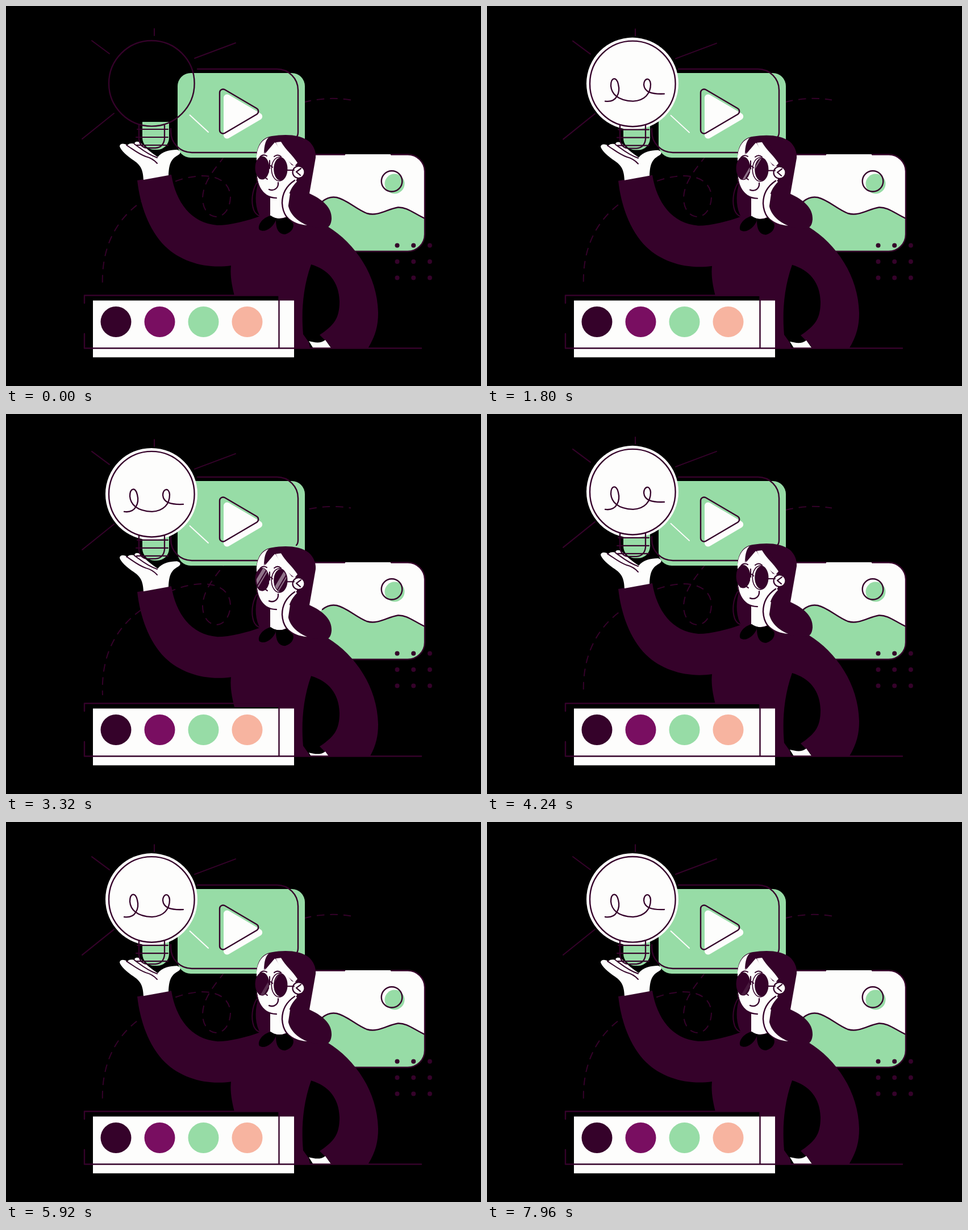
Write an HTML page with a canvas that moves like this. It is 836x669 px and loops after 8 s.

```html
<!DOCTYPE html>
<html lang="en">
<head>
<meta charset="utf-8">
<title>Creative idea</title>
<style>
html, body { margin: 0; width: 100%; height: 100%; overflow: hidden; background: #000; }
canvas { display: block; width: 836px; height: 669px; }
</style>
</head>
<body>
<canvas id="stage" width="836" height="669"></canvas>
<script>
const ctx = document.getElementById('stage').getContext('2d');
const LOOP = 8000, BOB = 2000, LIT = 320;
const BODY_DIP = 8, BULB_DIP = 6.4;
const DARK = '#35022a', WHITE = '#fdfdfc', GREEN = '#97dca6', BLACK = '#000';
const MAGENTA = '#790e61', PEACH = '#f7b4a0';

const fill = (d, color) => {
  ctx.fillStyle = color;
  ctx.fill(new Path2D(d));
};
const line = (d, color = DARK, width = 2.4) => {
  ctx.strokeStyle = color;
  ctx.lineWidth = width;
  ctx.stroke(new Path2D(d));
};
const oval = (x, y, rx, ry, color, stroke) => {
  ctx.beginPath();
  ctx.ellipse(x, y, rx, ry, 0, 0, Math.PI * 2);
  if (color) { ctx.fillStyle = color; ctx.fill(); }
  if (stroke) { ctx.strokeStyle = DARK; ctx.lineWidth = stroke; ctx.stroke(); }
};
const disc = (x, y, r, color, stroke) => oval(x, y, r, r, color, stroke);
const box = (x, y, w, h, r, color) => {
  ctx.beginPath();
  ctx.roundRect(x, y, w, h, r);
  ctx.fillStyle = color;
  ctx.fill();
};
const shifted = (x, y, paint) => {
  ctx.save();
  ctx.translate(x, y);
  paint();
  ctx.restore();
};
const clamp = v => Math.max(0, Math.min(1, v));

function trail(shift) {
  ctx.lineCap = 'butt';
  ctx.setLineDash([13.5, 10]);
  ctx.lineDashOffset = shift;
  line('M607 165.500C580 161 552 162 522 170C470 184 415 225 382 268', DARK, 2);
  ctx.lineDashOffset = -8 - shift;
  line('M170 495C167 430 190 380 235 347C265 322 300 301 345 299C382 299 395 318 395 337' +
    'C394 358 383 371 370 371C355 370 346 356 346 338C347 312 363 292 382 268', DARK, 2);
  ctx.setLineDash([]);
  ctx.lineCap = 'round';
}

function playShape() {
  const path = new Path2D();
  path.moveTo(376, 185);
  path.arcTo(376, 142, 450, 185.5, 6);
  path.arcTo(450, 185.5, 376, 229, 6);
  path.arcTo(376, 229, 376, 185, 6);
  path.closePath();
  return path;
}

function videoCard() {
  box(302, 118, 224, 149, 23, GREEN);
  line('M337 111H477A37 37 0 0 1 514 148V222Q514 228 511 231');
  line('M290 216V221A37 37 0 0 0 327 258H442');
  const play = playShape();
  ctx.fillStyle = WHITE;
  shifted(7, 9, () => ctx.fill(play));
  ctx.strokeStyle = DARK;
  ctx.lineWidth = 2.4;
  ctx.stroke(play);
}

function pictureCard() {
  const hill = 'M557 344C566 336.500 574 335.500 582 337C600 341 615 357 635 365' +
    'C655 371 672 357 690 354.500C706 354 716 364 737 374';
  ctx.save();
  ctx.beginPath();
  ctx.roundRect(500, 261, 237, 171, 30);
  ctx.clip();
  ctx.fillStyle = WHITE;
  ctx.fillRect(500, 261, 237, 171);
  fill(hill + 'V432H530V364Z', GREEN);
  ctx.restore();
  line(hill);
  line('M540 261.500H596M678 261.500H707A30 30 0 0 1 737 291V402A30 30 0 0 1 707 432H605');
  disc(684, 313, 17.500, GREEN);
  disc(679, 308.500, 18.300, null, 2.4);
  for (let i = 0; i < 9; i++) disc(688.500 + i % 3 * 28.700, 421.500 + Math.floor(i / 3) * 28.500, 4, DARK);
}

function body() {
  fill('M447 370C425 378 395 386 372 386C325 382 299 345 291 297L231 307C236 350 251 394 280 423' +
    'C310 452 355 463 396 457C394 475 398 494 402 510H480V620H625C648 590 655 568 655 540' +
    'C654 475 615 418 566 388L530 372Z', DARK);
  // gap between torso and bent arm
  fill('M537 455C521 500 520 545 523 578L533 592L537 610H575L570 598L561 588L552 579L558 575' +
    'C577 561 587 550 587 520C586 485 567 464 537 455Z', BLACK);
  fill('M533 590C542 592 553 595 562 588L572 602V614H548Z', WHITE);
}

function raisedHand() {
  fill('M242 306C241 289 238 281 225 272C213 264 202 254 200 247C201 241 208 242 214 245' +
    'C217 241 223 242 226 243C226 238 233 237 238 242C248 252 257 259 267 266' +
    'C275 256 288 253 301 253C309 255 308 260 302 263C290 270 287 278 286 298Z', WHITE);
  line('M212 245C222 251 232 260 246 265Q258 268 266 277', DARK, 2);
  line('M226 243C236 250 248 261 266 267', DARK, 2);
}

function lens(x, y, rx, ry, sheen) {
  oval(x, y, rx, ry, DARK);
  if (!sheen.alpha) return;
  ctx.save();
  ctx.beginPath();
  ctx.ellipse(x, y, rx - 1, ry - 1, 0, 0, Math.PI * 2);
  ctx.clip();
  ctx.globalAlpha = sheen.alpha;
  ctx.lineCap = 'butt';
  for (const at of [sheen.x, sheen.x - 40]) {
    line(`M${at + 16} 260L${at - 16} 314`, WHITE, 6);
    line(`M${at + 23} 260L${at - 9} 314`, WHITE, 2);
  }
  ctx.restore();
}

function head(sheen) {
  // hair behind the face
  fill('M441 262C443 242 453 231 468 229C492 225 517 226 533 238C541 245 546 256 545 267' +
    'L534 330C556 340 574 354 573 375C572 385 569 389 563 391C540 389 520 388 503 381L480 330Z', DARK);
  fill('M443 314C437 335 439 358 448 372H468V330Z', DARK);
  line('M441 312C433 326 431 345 436 359Q439 367 447 370', DARK, 2.2);
  fill('M465 333V369Q478 378 494 371L500 330Z', WHITE);
  fill('M441 263C443 246 451 234 464 231Q456 243 456 260L473 240C487 250 498 259 512 276V305' +
    'C500 314 492 325 489 339C475 340 464 338 457 332C445 322 442 308 441 290Z', WHITE);
  line('M441 302C443 316 448 326 458 333Q466 338 476 338', DARK, 2.2);
  // dark fringe and its parted lock
  fill('M464 230Q454 237 454 261C459 249 467 246 474 239C480 252 492 265 503 280L512 282V268L490 230Z', DARK);
  fill('M475 240L484 239C492 253 504 262 513 276L508 282C492 270 482 257 475 240Z', WHITE);
  fill('M510 306C493 316 486 331 486 347C487 368 502 384 530 386C508 377 496 361 496 344C497 329 503 318 512 309Z', WHITE);
  line('M508 307C493 317 486 331 486 347C487 364 495 378 512 384', DARK, 2.4);
  disc(515, 292.500, 10.500, WHITE, 2.2);
  line('M519 286L511 292L518 298', DARK, 2.2);

  line('M447 266Q452 260 459 264M472 265Q478 260 484 265', DARK, 2);
  lens(451, 285, 12.500, 20.500, sheen);
  oval(481, 287, 13.700, 21, WHITE, 1.6);
  lens(483, 287, 11.800, 20, sheen);
  line('M442 272C438 282 440 298 447 304', DARK, 1.5);
  line('M462 283Q466 279 469 284M464 272V286M494 289L507 289', DARK, 2);
  line('M462 292L456 302L460 305', DARK, 2);
  line('M463 323C473 327 480 319 479 311', DARK, 2.3);
}

function collar() {
  fill('M466 369C450 373 442 387 446 394C456 400 470 390 475 377C475 393 480 402 491 402' +
    'C503 399 508 389 505 382L494 372Q478 378 466 369Z', BLACK);
}

function bulb(lit) {
  box(240, 204, 47, 49, [0, 0, 21, 21], GREEN);
  if (lit) disc(256, 136, 81, WHITE);
  line('M234 209V234Q236 250 250 250H263Q277 249 279 234V209', DARK, 2.3);
  line('M231 217H285M229 231H285M230 245H285', DARK, 2.2);
  disc(256.300, 136.300, 75.300, null, 2.4);
  if (lit) {
    line('M208 167C228 170 235 152 231 137C228 123 218 125 218 140C219 153 229 166 257 167' +
      'C278 166 288 153 288 137C287 124 276 126 276 138C277 151 290 155 312 154', DARK, 2.3);
  }
  line('M151 61L182 84M261 40V52M332 92L404 65M134 234L190 189', DARK, 2);
  line('M323.500 192L356 222', WHITE, 2);
}

function palette() {
  box(153, 518.5, 354, 100, 0, WHITE);
  [DARK, MAGENTA, GREEN, PEACH].forEach((c, i) => disc(193.500 + i * 77, 556, 27, c));
  line('M138 523V509.500H480.500V602.500M138 577V602.500H731');
}

function draw(t) {
  const p = t % BOB;
  const sway = (1 - Math.cos(p / BOB * Math.PI * 2)) / 2;
  const sheen = {
    x: 461 + 35 * Math.pow((BOB - p) / 880, 1.8),
    alpha: 0.45 * clamp((p - 850) / 200) * clamp((BOB - p) / 200)
  };
  ctx.fillStyle = BLACK;
  ctx.fillRect(0, 0, 836, 669);
  ctx.lineCap = ctx.lineJoin = 'round';
  trail(sway * 13);
  videoCard();
  pictureCard();

  ctx.save();
  ctx.beginPath();
  ctx.rect(0, 0, 836, 602);
  ctx.clip();
  shifted(0, sway * BODY_DIP, () => {
    body();
    raisedHand();
    head(sheen);
    collar();
  });
  shifted(0, sway * BULB_DIP, () => bulb(t >= LIT));
  ctx.restore();

  palette();
}

const start = performance.now();
function tick() {
  const t = (performance.now() - start) % LOOP;
  draw(Math.floor(t / 40) * 40);
  requestAnimationFrame(tick);
}
tick();
</script>
</body>
</html>
```
